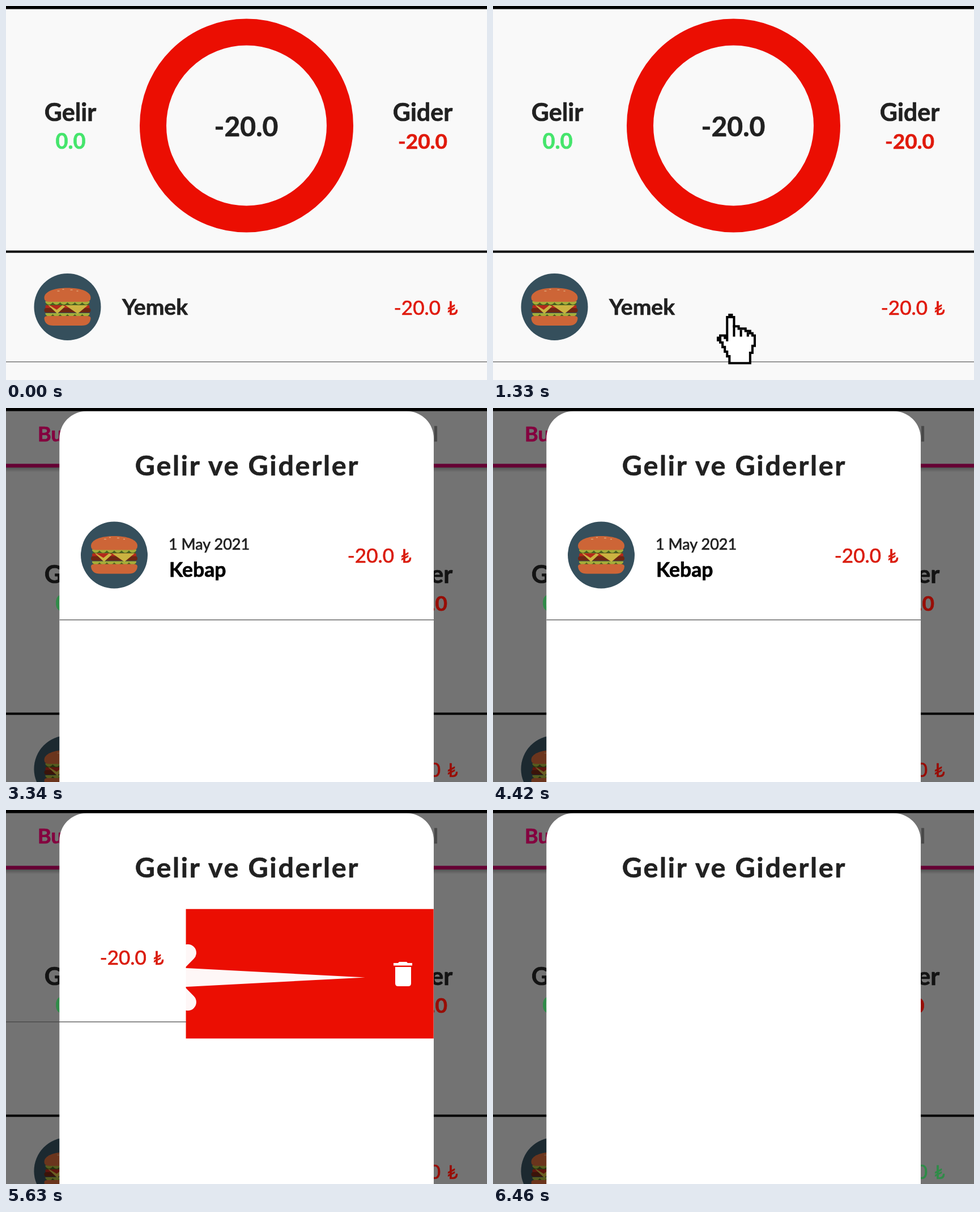
Recreate the animation shown at these times as an HTML page. Size 849 by 660 pixels, loop 7.47 s.

```html
<!DOCTYPE html>
<html lang="tr">
<head>
<meta charset="utf-8">
<style>
html, body { margin: 0; width: 100%; height: 100%; overflow: hidden; background: #f9f9f9; }
svg { display: block; width: 100vw; height: 100vh; }
text { font-family: Lato, "Noto Sans", "DejaVu Sans", sans-serif; stroke-linejoin: round; stroke-width: .7; }
.b { font-weight: 700; }
</style>
</head>
<body>
<svg id="stage" viewBox="0 0 849 660"></svg>
<script>
const LOOP = 7470;
const ROW_TOP = 174.5, ROW_H = 229;

function text(s, x, y, size, color, bold = true, anchor = "start", extra = "") {
  return `<text x="${x}" y="${y}" font-size="${size}" fill="${color}" stroke="${color}" text-anchor="${anchor}" class="${bold ? "b" : ""}" ${extra}>${s}</text>`;
}

function lira(value, right, y, color) {
  return text(value, right - 31, y, 35, color, false, "end") + text("₺", right, y, 33, color, false, "end");
}

// Dark lettuce with a light wavy edge, centred on x = 0
function lettuce(y) {
  let d = `M-39 ${y}`;
  for (let i = 0; i < 6; i++) d += "q6.5 8 13 0";
  return `<rect x="-38" y="${y - 2}" width="76" height="8" rx="2" fill="#47601f"/>
    <path d="${d}V${y - 2}H-39z" fill="#a4ad3a"/>`;
}

function burger(x, y, shade = 0) {
  return `<g transform="translate(${x} ${y})">
    <circle r="59" fill="#354f5c"/>
    ${lettuce(-8)}
    ${lettuce(13)}
    <path d="M-41 -16C-41 -27 -24 -33.5 0 -33.5S41 -27 41 -16Q41 -9 33 -9H-33Q-41 -9 -41 -16z" fill="#cd6537"/>
    <path d="M-18 -28h4M-9 -31h3M5 -30h4M16 -28h3" stroke="#dfa274" stroke-width="1.6"/>
    <rect x="-39" y="-3" width="78" height="6" rx="2" fill="#b3281b"/>
    <rect x="-41" y="2" width="82" height="8" rx="4" fill="#6e2613"/>
    <path d="M-34 -3L-18 12L-4 -1L-9 -3zM-4 -3L18 12L36 -3z" fill="#cbb341"/>
    <path d="M-32 -3L-19 5L-9 -3z" fill="#b3281b"/>
    <path d="M-34 16H34Q41 16 41 20Q40 33 25 33H-25Q-40 33 -41 20Q-41 16 -34 16z" fill="#cd6537"/>
    <circle r="59" fill="#000" opacity="${shade}"/>
  </g>`;
}

function page(c, spent) {
  const value = spent ? "-20.0" : "0.0";
  return `<circle cx="424.5" cy="211" r="165" fill="none" stroke="${c.ring}" stroke-width="47"/>
    ${text("Gelir", 113.5, 203, 43, c.ink, true, "middle")}
    ${text("0.0", 114, 252, 38, c.green, true, "middle")}
    ${text("Gider", 735.5, 203, 43, c.ink, true, "middle")}
    ${text(value, 735.5, 252, 37, c.red, true, "middle")}
    ${text(value, 424, 230, 48, c.ink, true, "middle")}
    <rect y="431.5" width="849" height="4" fill="#000"/>
    ${burger(108.5, 531, c.shade)}
    ${text("Yemek", 205, 545, 39, c.ink)}
    ${lira(value, 798, 545, spent ? c.red : c.green)}
    <rect y="627.2" width="849" height="1.5" fill="${c.line}"/>`;
}

const light = { ink: "#212121", red: "#e01a0c", green: "#45e56c", ring: "#eb0e02", line: "#777", shade: 0 };
const dim = { ink: "#131313", red: "#980d06", green: "#2f8c48", ring: "#6c0600", line: "#383838", shade: .48 };

const hand = "M4.5 12V1.5h1v-1h1v1h1v4h2v1h3v1h2v1h1v1h1v4.5h-1v3h-1v4.5h-9v-3h-1v-2h-1v-2h-1v-2h-1v-1h-1v-1h1v-1h2v1h1z";

document.getElementById("stage").innerHTML = `
  <defs>
    <linearGradient id="shadow" x2="0" y2="1"><stop stop-opacity=".28"/><stop offset="1" stop-opacity="0"/></linearGradient>
    <clipPath id="rowClip"><rect id="rowBox" y="${ROW_TOP}" height="${ROW_H}"/></clipPath>
  </defs>
  <rect width="849" height="660" fill="#f9f9f9"/>
  <g id="home">${page(light, true)}</g>
  <g id="hand"><g transform="translate(395 543) scale(4.06)" stroke="#000">
    <path d="${hand}" fill="#fff"/>
    <path d="M7.5 5V10M10.5 7V10M13.5 8V10" fill="none"/>
  </g></g>
  <g id="back">
    <rect width="849" height="660" fill="#737373"/>
    <g transform="translate(0 106)"><g id="before">${page(dim, true)}</g><g id="after">${page(dim, false)}</g></g>
    ${text("Bu Ay", 56, 59, 36, "#84003f")}
    ${text("Genel", 763, 59, 36, "#484848", true, "end")}
    <rect y="98.5" width="849" height="6.5" fill="#650034"/>
    <rect y="105" width="849" height="8" fill="url(#shadow)"/>
  </g>
  <g id="sheet">
    <path d="M94.3 700V53.5a48 48 0 0 1 48 -48H707a48 48 0 0 1 48 48V700z" fill="#fff"/>
    ${text("Gelir ve Giderler", 426, 119, 48.5, "#212121", true, "middle", 'letter-spacing="2.7"')}
    <g clip-path="url(#rowClip)"><g id="delete">
      <rect x="94.5" y="${ROW_TOP}" width="660.5" height="${ROW_H}" fill="#eb0e02"/>
      <path d="M684 270h8l2 -2h13l2 2h8v4.5h-33zM687 277h28v29q0 5 -5 5h-18q-5 0 -5 -5z" fill="#fff"/>
    </g></g>
    <g id="item">
      ${burger(191, 259.5)}
      ${text("1 May 2021", 287, 250, 27, "#212121", false)}
      ${text("Kebap", 288, 298, 35.5, "#000")}
      ${lira("-20.0", 716, 273, "#da1c0e")}
      <rect x="94.5" y="373.3" width="660.5" height="1.2" fill="#444"/>
    </g>
  </g>
  <g id="arrow">
    <path d="M0 0L-315 -16.5H-350V16.5H-315z" fill="#fff"/>
    <path d="M-313 -43.5L-356 0L-313 43.5" fill="none" stroke="#fff" stroke-width="30" stroke-linecap="round" stroke-linejoin="round"/>
  </g>
  <rect width="849" height="5.5" fill="#000"/>`;

const el = {};
document.querySelectorAll("[id]").forEach(n => el[n.id] = n);

const clamp = v => Math.max(0, Math.min(1, v));
const ramp = (t, a, b) => clamp((t - a) / (b - a));
const easeOut = v => 1 - (1 - v) ** 3;
const show = (n, on) => n.setAttribute("display", on ? "inline" : "none");
const move = (n, x, y) => n.setAttribute("transform", `translate(${x} ${y})`);

// Piecewise linear value from [time, value] pairs
function track(t, keys) {
  let v = keys[0][1];
  for (let i = 1; i < keys.length; i++) v += (keys[i][1] - keys[i - 1][1]) * ramp(t, keys[i - 1][0], keys[i][0]);
  return v;
}

function draw(t) {
  const open = t >= 2860;
  show(el.home, !open);
  show(el.back, open);
  show(el.sheet, open);
  show(el.before, t < 6340);
  show(el.after, t >= 6340);

  show(el.hand, t > 780 && t < 2300);
  move(el.hand, 0, 120 * (1 - easeOut(ramp(t, 780, 1300))));
  el.hand.setAttribute("opacity", 1 - ramp(t, 2000, 2300));

  move(el.sheet, 0, 655 * (1 - easeOut(ramp(t, 2860, 3200))));

  const slide = track(t, [[4840, 0], [5090, -110], [5630, -436], [5920, -770]]);
  move(el.item, slide, 0);
  show(el.item, t < 5950);

  const h = ROW_H * (1 - easeOut(ramp(t, 6000, 6320)));
  const w = Math.min(660.5, -slide);
  el.rowBox.setAttribute("x", 754.7 - w);
  el.rowBox.setAttribute("width", w);
  el.rowBox.setAttribute("height", h);
  move(el.delete, 0, (h - ROW_H) / 2);

  const fade = track(t, [[4940, 0], [5090, .42], [5300, .97], [5720, .97], [5940, 0]]);
  show(el.arrow, fade > 0);
  el.arrow.setAttribute("opacity", fade);
  move(el.arrow, track(t, [[4940, 705], [5090, 689], [5630, 634], [5940, 602]]), 295.5);
}

const start = performance.now();
function tick() {
  draw((performance.now() - start) % LOOP);
  requestAnimationFrame(tick);
}
tick();
</script>
</body>
</html>
```
